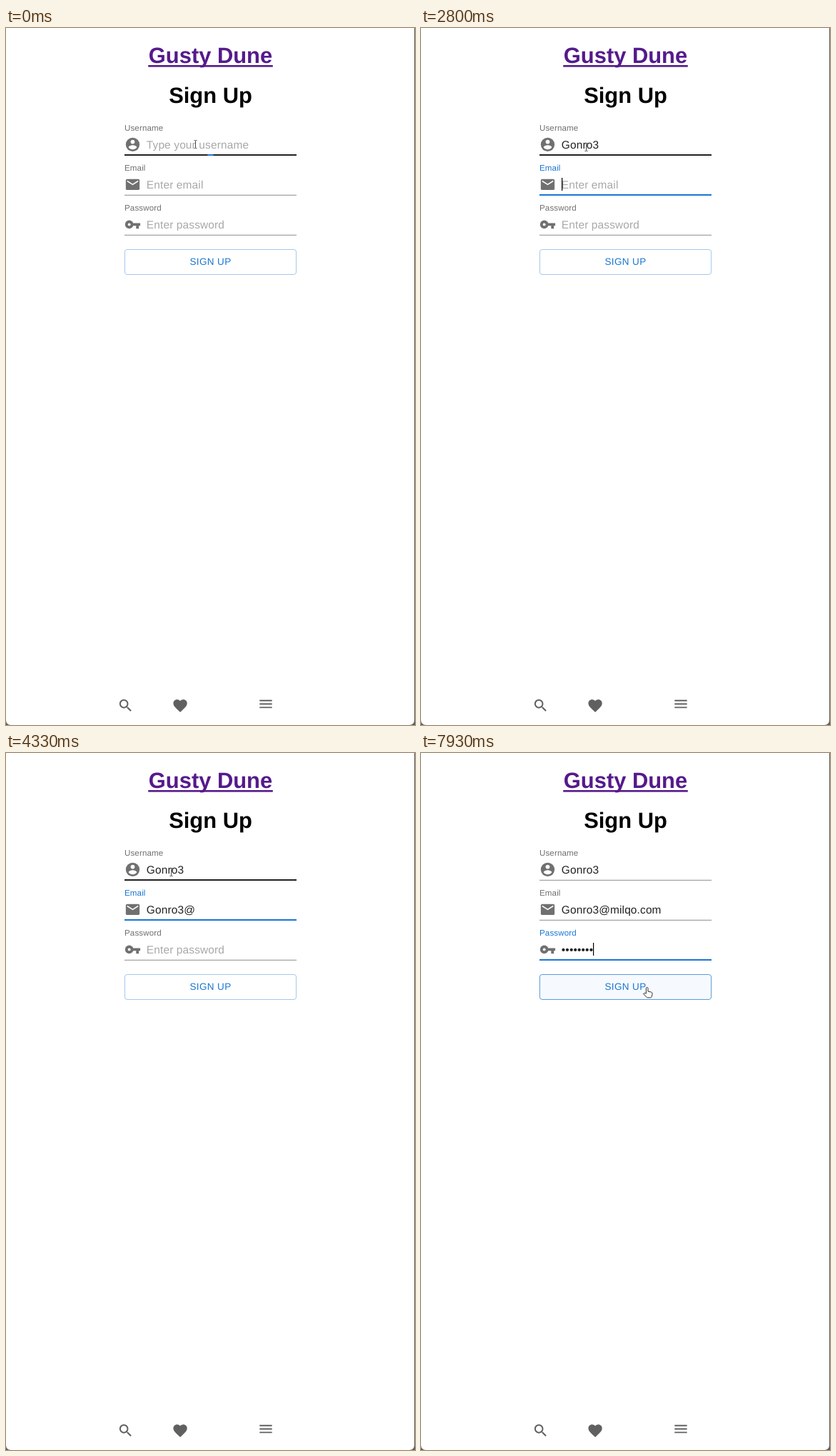
Write an HTML page that moves like this. It is 573x977 px and loops after 8000 ms.

```html
<!DOCTYPE html>
<html lang="en">
<head>
<meta charset="utf-8">
<title>Sign up form</title>
<style>
html, body { margin: 0; width: 100%; height: 100%; overflow: hidden; background: #5c5f5e; }
svg { display: block; position: absolute; left: 0; top: 0; }
text { font-family: "Liberation Sans", Arial, sans-serif; white-space: pre; text-rendering: geometricPrecision; }
.title { font-size: 30.9px; font-weight: bold; text-anchor: middle; }
.label { font-size: 11.58px; letter-spacing: .00938em; }
.value { font-size: 15.44px; letter-spacing: .00938em; fill: #212121; }
.hint { fill: #a8a8a8; }
.button { font-size: 13.51px; letter-spacing: .02857em; fill: #1976d2; }
.popup text { font-family: "Open Sans", "Noto Sans", sans-serif; font-size: 11.9px; fill: #fff; }
.popup { filter: drop-shadow(0 1px 1.5px rgba(0, 0, 0, .5)); }
.icon { fill: #707070; }
.nav { fill: #606060; }
.hole { fill: #fff; }
</style>
</head>
<body>
<svg id="stage" width="573" height="977" viewBox="0 0 573 977">
  <path fill="#fff" d="M0 0H572V970q0 7-7 7H7q-7 0-7-7z"/>
  <text class="title" x="286.5" y="49" fill="#551a8b">Gusty Dune</text>
  <rect x="199.2" y="52" width="174.6" height="2.6" fill="#551a8b"/>
  <text class="title" x="286.5" y="105">Sign Up</text>
  <g id="form"></g>
  <rect id="button" x="166.4" y="310.5" width="240.2" height="35" rx="3.5"/>
  <text class="button" x="257.4" y="332.4">SIGN UP</text>
  <g class="nav">
    <path transform="translate(156 938.2) scale(.965)" d="M15.5 14h-.79l-.28-.27C15.41 12.59 16 11.11 16 9.5 16 5.91 13.09 3 9.5 3S3 5.91 3 9.5 5.91 16 9.5 16c1.61 0 3.09-.59 4.23-1.57l.27.28v.79l5 4.99L20.49 19zm-6 0C7.01 14 5 11.99 5 9.5S7.01 5 9.5 5 14 7.01 14 9.5 11.99 14 9.5 14z"/>
    <path transform="translate(232.5 938.3) scale(.965)" d="M12 21.35l-1.45-1.32C5.4 15.36 2 12.28 2 8.5 2 5.42 4.42 3 7.5 3c1.74 0 3.41.81 4.5 2.09C13.09 3.81 14.76 3 16.5 3 19.58 3 22 5.42 22 8.5c0 3.78-3.4 6.86-8.55 11.54z"/>
    <path transform="translate(352.4 936) scale(.965)" d="M3 6h18v2H3zM3 11h18v2H3zM3 16h18v2H3z"/>
  </g>
  <g id="popups"></g>
  <g id="mouse">
    <path id="beam" fill="none" stroke="#4a4a4a" d="M-2-5.5h1.4l.6.5.6-.5H2M0-5V5M-2 5.5h1.4L0 5l.6.5H2"/>
    <path id="arrow" fill="#fff" stroke="#222" stroke-width=".9" d="M0 0V13l3-2.8 2 4.6 2-.9-2-4.4h4.2z"/>
    <path id="hand" fill="#fff" stroke="#333" stroke-linejoin="round" d="M-1.4 8.5V1.2a1.3 1.3 0 0 1 2.6 0V5.5l4.4 1q2 .6 1.7 2.5l-.9 4q-.3 1.3-1.5 1.3H.7q-1 0-1.6-.8l-4.4-4.6q.8-1.6 3.9-.4z"/>
  </g>
</svg>
<script>
const LOOP = 8000, FRAME = 200 / 3, FADE = 75, BLINK = 200, LEFT = 196.8;
const $ = id => document.getElementById(id);
const clamp = v => Math.min(1, Math.max(0, v));

const fields = [
  { label: 'Username', hint: 'Type your username', text: 'Gonro3', focus: -.6, blur: 2660,
    keys: [1470, 1600, 1670, 1870, 1930, 2270],
    icon: '<circle cx="12" cy="12" r="10"/><circle class="hole" cx="12" cy="8" r="3"/><path class="hole" d="M6 16c0-2 4-3.1 6-3.1s6 1.1 6 3.1a7.2 7.2 0 0 1-12 0z"/>' },
  { label: 'Email', hint: 'Enter email', text: 'Gonro3@milqo.com', focus: 2660, blur: 5549,
    keys: [3130, 3270, 3330, 3530, 3530, 3870, 4130, 4470, 4530, 4670, 4800, 4930, 5070, 5130, 5270, 5330],
    icon: '<rect x="2" y="4" width="20" height="16" rx="2"/><path class="hole" d="M4 6l8 5 8-5v2l-8 5-8-5z"/>' },
  { label: 'Password', hint: 'Enter password', text: '•'.repeat(8), focus: 5549, blur: Infinity,
    keys: [5730, 5870, 6000, 6200, 6330, 6470, 6530, 6670],
    icon: '<circle cx="7" cy="12" r="6"/><path d="M12 10H23v4H21v4H17V14H12z"/><circle class="hole" cx="7" cy="12" r="2"/>' }
];

const popups = [
  { y: 180.2, from: 1530, to: 1670, fade: 1, width: 91, rows: ['Gonro1', 'Gonro2', 'Gatrel', 'Gurdon4', 'Gilvane1'] },
  { y: 180.2, from: 1670, to: 2270, fade: 200, width: 81, rows: ['Gonro1', 'Gonro2'] },
  { y: 236.2, from: 3130, to: 3870, fade: 200, width: 150.5, rows: ['Gonro2@milqo.com', 'Gonro1@milqo.com'] }
];

// time, x, y
const mousePath = [
  [0, 265.5, 163], [130, 262, 164], [330, 231.5, 167], [6870, 231.5, 167], [7000, 266, 118],
  [7070, 286, 97], [7130, 294, 86], [7200, 299, 92], [7330, 304, 150], [7470, 303, 245],
  [7600, 306, 325], [7670, 309, 350], [7730, 313, 340], [7800, 316.8, 328.6]
];

const caretResets = [70, 130, 2730, 3600, 5549, ...fields.flatMap(f => f.keys)];

function addGroup(parent, y, html) {
  const g = document.createElementNS('http://www.w3.org/2000/svg', 'g');
  g.setAttribute('transform', `translate(0 ${y})`);
  g.innerHTML = html;
  parent.append(g);
  return g;
}

function buildField(f, i) {
  const g = addGroup($('form'), 56 * i, `<text class="label" x="166" y="144">${f.label}</text>
    <g class="icon" transform="translate(165.9 151.8) scale(.965)">${f.icon}</g>
    <text class="value" x="${LEFT}" y="168.8"></text>
    <rect class="rule" x="166" width="241"/>
    <rect class="active" y="177" height="2" fill="#1976d2"/>
    <rect class="caret" y="154" width="1.2" height="18"/>`);
  for (const name of ['label', 'value', 'rule', 'active', 'caret']) f[name + 'El'] = g.querySelector('.' + name);
}

function buildPopup(p) {
  p.el = addGroup($('popups'), p.y, `<path fill="#292a2d" d="M294.5 8l8-8 8 8z"/>
    <rect x="281.7" y="7" width="${p.width}" height="${p.rows.length * 34.7 + 7.8}" rx="4" fill="#292a2d"/>` +
    p.rows.map((row, i) => `<text x="293" y="${33.5 + 34.7 * i}">${row}</text>`).join(''));
  p.el.setAttribute('class', 'popup');
}

// cubic-bezier(0, 0, .2, 1)
function ease(x) {
  x = clamp(x);
  let lo = 0, hi = 1;
  for (let i = 0; i < 24; i++) {
    const s = (lo + hi) / 2;
    if (.6 * s * s + .4 * s ** 3 < x) lo = s; else hi = s;
  }
  return 3 * hi * hi - 2 * hi ** 3;
}

function mouseAt(t) {
  const next = mousePath.findIndex(p => p[0] > t);
  if (next < 0) return mousePath[mousePath.length - 1].slice(1);
  const [t0, x0, y0] = mousePath[next - 1], [t1, x1, y1] = mousePath[next];
  const k = (t - t0) / (t1 - t0);
  return [x0 + (x1 - x0) * k, y0 + (y1 - y0) * k];
}

const mix = (a, b, k) => `rgb(${a.map((v, i) => Math.round(v + (b[i] - v) * k))})`;
const show = (el, on) => el.setAttribute('visibility', on ? 'visible' : 'hidden');
function set(el, attrs) { for (const name in attrs) el.setAttribute(name, attrs[name]); }

function drawField(f, i, t, hovered) {
  const open = ease((t - f.focus) / FADE) - ease((t - f.blur) / FADE);
  const typed = f.text.slice(0, f.keys.filter(k => k <= t).length);
  f.labelEl.setAttribute('fill', mix([112, 112, 112], [25, 118, 210], open));
  f.valueEl.textContent = typed || f.hint;
  f.valueEl.classList.toggle('hint', !typed);
  set(f.ruleEl, hovered ? { y: 177, height: 2, fill: '#212121' } : { y: 177.8, height: 1, fill: '#8c8c8c' });
  set(f.activeEl, { x: 286.5 - 120.5 * open, width: 241 * open });

  const since = t - Math.max(...caretResets.filter(k => k <= t));
  const on = t >= 70 && t >= f.focus && t < f.blur && Math.floor(since / BLINK) % 2 === 0;
  show(f.caretEl, on);
  if (on) f.caretEl.setAttribute('x', Math.floor(LEFT + .3 + (typed ? f.valueEl.getComputedTextLength() : 0)));
}

function draw(t) {
  const [x, y] = mouseAt(t);
  const inForm = x > 166 && x < 407;
  const over = inForm ? fields.findIndex((f, i) => y > 148 + 56 * i && y < 179 + 56 * i) : -1;
  const onButton = inForm && y > 310 && y < 346;
  const onText = over >= 0 || (y > 76 && y < 112);

  fields.forEach((f, i) => drawField(f, i, t, i === over));
  for (const p of popups) p.el.setAttribute('opacity', t < p.from ? 0 : clamp(1 - (t - p.to) / p.fade));
  set($('button'), onButton ? { stroke: '#579bde', fill: '#f6f9fd' } : { stroke: '#a3c8ed', fill: '#fff' });
  $('mouse').setAttribute('transform', `translate(${x} ${y})`);
  show($('hand'), onButton);
  show($('beam'), onText);
  show($('arrow'), !onButton && !onText);
}

function tick() {
  const step = Math.floor((performance.now() % LOOP + 3.4) / FRAME) % (LOOP / FRAME);
  draw(Math.round(step * FRAME / 10) * 10);
  requestAnimationFrame(tick);
}

fields.forEach(buildField);
popups.forEach(buildPopup);
tick();
</script>
</body>
</html>
```
